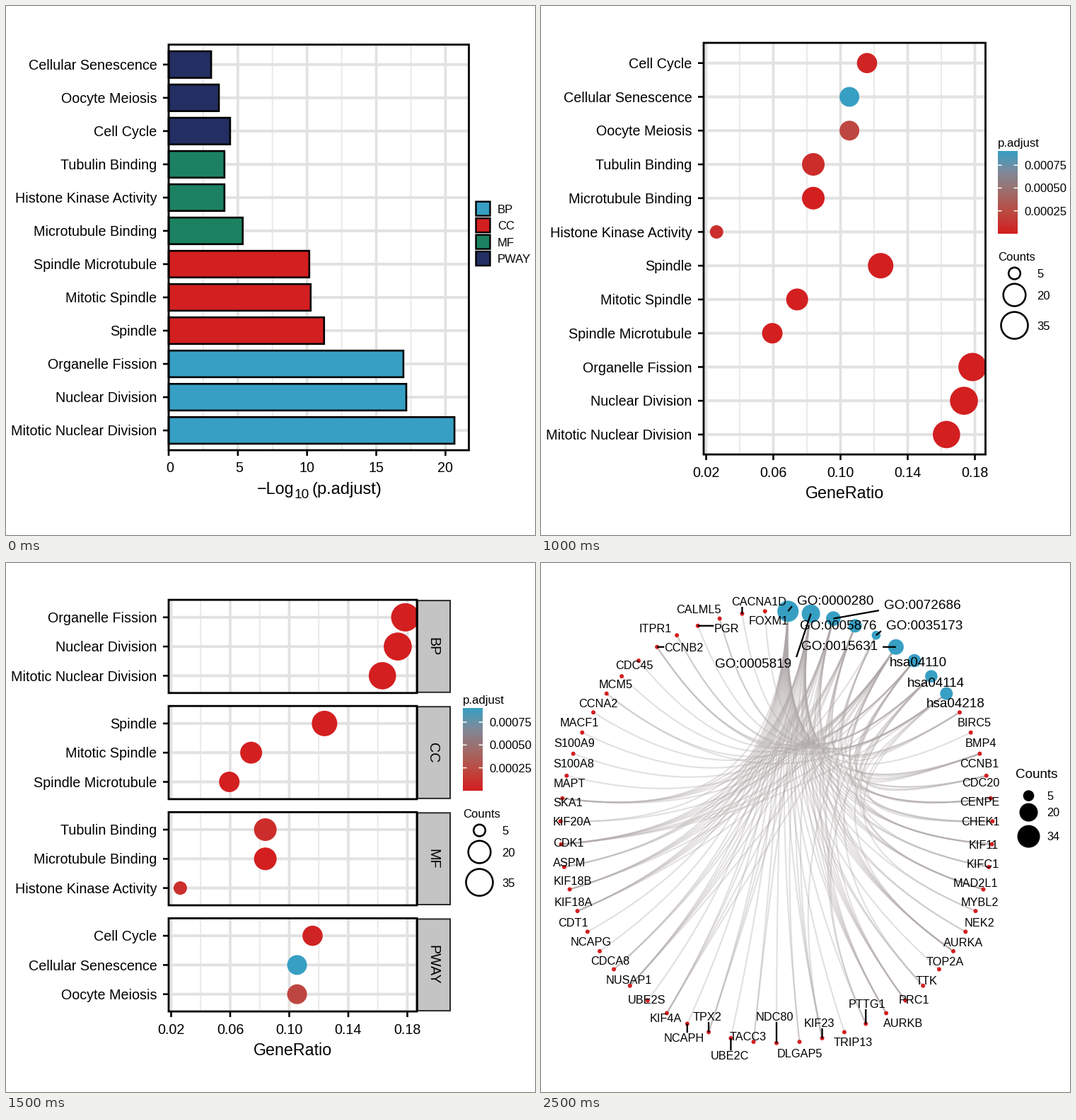
Write a matplotlib script that moves like this. It is 748 by 748 pixels and loops after 3 s.

```python
import numpy as np
import matplotlib.pyplot as plt
from matplotlib.animation import FuncAnimation
from matplotlib.colors import LinearSegmentedColormap
from matplotlib.patches import Circle, Rectangle
from matplotlib.collections import LineCollection

SIZE = 748
PT = 0.72  # points per pixel at 100 dpi
LIFT = 0.4
TERM, HUB, GENE = 19.8, 18.9, 16.3  # text sizes in pixels
BLUE, RED, GREEN, NAVY = "#379fc3", "#d31f20", "#1b8161", "#232f62"
EDGE = (0.69, 0.66, 0.66, 0.36)
RAMP = LinearSegmentedColormap.from_list(
    "ramp", [BLUE, "#7f8999", "#a06c6a", "#bd4840", RED])

plt.rcParams["font.family"] = "Liberation Sans"
fig = plt.figure(figsize=(SIZE / 100, SIZE / 100), dpi=100, facecolor="white")
ax = fig.add_axes([0, 0, 1, 1])

# group: (colour, [(term, -log10 p)])
BARS = {
    "BP": (BLUE, [("Organelle Fission", 16.96), ("Nuclear Division", 17.17),
                  ("Mitotic Nuclear Division", 20.65)]),
    "CC": (RED, [("Spindle Microtubule", 10.16), ("Mitotic Spindle", 10.26),
                 ("Spindle", 11.23)]),
    "MF": (GREEN, [("Tubulin Binding", 4.03), ("Histone Kinase Activity", 4.03),
                   ("Microtubule Binding", 5.35)]),
    "PWAY": (NAVY, [("Cellular Senescence", 3.07), ("Oocyte Meiosis", 3.63),
                    ("Cell Cycle", 4.44)]),
}

# group: [(term, gene ratio, radius, colour)]
DOTS = {
    "BP": [("Organelle Fission", .1786, 20, RED), ("Nuclear Division", .1735, 19.8, RED),
           ("Mitotic Nuclear Division", .1631, 19.3, RED)],
    "CC": [("Spindle", .1239, 18, RED), ("Mitotic Spindle", .0742, 15.5, RED),
           ("Spindle Microtubule", .0594, 14.5, RED)],
    "MF": [("Tubulin Binding", .0838, 16, "#cc2d2b"), ("Microtubule Binding", .0838, 16, RED),
           ("Histone Kinase Activity", .0262, 9.5, "#cb2f2d")],
    "PWAY": [("Cell Cycle", .1158, 14.3, "#d02324"), ("Cellular Senescence", .1053, 14, BLUE),
             ("Oocyte Meiosis", .1053, 14, "#be4640")],
}

# hub: (x, y, label x, label y, radius), in ring order
HUBS = {
    "GO:0000280": (314, 375, 372, 378, 15), "GO:0005819": (302, 403, 292, 406, 13),
    "GO:0072686": (326, 437, 361, 435, 10.3), "GO:0005876": (278, 380, 250, 366, 9.5),
    "GO:0035173": (440, 222, 420, 208, 6.3), "GO:0015631": (152, 534, 142, 539, 11),
    "hsa04110": (487, 228, 509, 237, 9.3), "hsa04114": (522, 312, 531, 306, 8.8),
    "hsa04218": (552, 405, 553, 405, 9),
}

# gene: (x, y[, label x, label y])
RIGHT = {
    "MCM5": (473, 72), "CDC45": (532, 100), "PGR": (595, 174), "CCNA2": (607, 246),
    "CCNB2": (607, 285, 613, 282), "CALML5": (641, 350, 627, 350), "ITPR1": (634, 399),
    "CACNA1D": (651, 489, 620, 489), "FOXM1": (616, 540), "MYBL2": (453, 444, 479, 434),
    "CDK1": (443, 385, 461, 398), "CCNB1": (435, 350, 467, 361),
    "CHEK1": (454, 330, 466, 334), "AURKA": (392, 362, 389, 350),
    "MAD2L1": (401, 325, 393, 318), "CDC20": (398, 293, 399, 291),
    "PTTG1": (406, 252, 408, 252), "TPX2": (368, 481, 358, 486),
    "ASPM": (341, 508, 354, 515), "NCAPG": (413, 497, 422, 505),
    "NDC80": (404, 450, 421, 463), "TRIP13": (389, 529, 418, 536),
    "UBE2C": (353, 549, 357, 562),
}
LEFT = {
    "TTK": (355, 258, 352, 258), "TOP2A": (311, 209, 325, 222),
    "NCAPH": (279, 208, 277, 195), "CDT1": (247, 217, 239, 222),
    "UBE2S": (214, 237, 205, 248), "BMP4": (183, 271, 172, 275),
    "CDCA8": (275, 274, 274, 266), "DLGAP5": (231, 293, 236, 302),
    "AURKB": (324, 298, 320, 293), "NEK2": (203, 318, 195, 328),
    "TACC3": (262, 322, 263, 328), "PRC1": (176, 379, 152, 366),
    "BIRC5": (193, 387, 199, 394), "KIF4A": (187, 417, 158, 421),
    "CENPE": (219, 426, 223, 435), "SKA1": (155, 444, 129, 448),
    "KIF11": (216, 457, 188, 461), "KIF18A": (241, 462, 266, 461),
    "NUSAP1": (237, 489, 207, 488), "KIF18B": (269, 491, 297, 488),
    "KIF23": (258, 520, 233, 515), "KIFC1": (284, 526, 292, 540),
    "KIF20A": (261, 594), "MACF1": (24, 506, 44, 506), "S100A9": (45, 574),
    "MAPT": (85, 634), "S100A8": (137, 675),
}
GENES = {**RIGHT, **LEFT}

LINKS = {
    "GO:0000280": "NCAPH TOP2A CDT1 UBE2S BMP4 CDCA8 DLGAP5 AURKB NEK2 TACC3 TTK PTTG1 "
                  "CDC20 MAD2L1 AURKA CHEK1 CCNB1 MYBL2 PRC1 BIRC5 KIF4A CENPE KIF11 KIF18A "
                  "NUSAP1 KIF18B KIF23 KIFC1 TPX2 ASPM NCAPG NDC80 TRIP13 UBE2C SKA1",
    "GO:0005819": "AURKA AURKB CDCA8 BIRC5 CDC20 CENPE DLGAP5 KIF11 KIF18A KIF18B KIF23 "
                  "KIFC1 MAD2L1 NEK2 NUSAP1 PRC1 TACC3 TPX2 TTK ASPM SKA1 CDK1 KIF4A CCNB1 "
                  "KIF20A",
    "GO:0072686": "ASPM AURKA AURKB CDCA8 CDK1 KIF11 KIF18A KIF18B MAD2L1 NUSAP1 PRC1 SKA1 "
                  "TPX2 KIF23 CENPE",
    "GO:0005876": "AURKA AURKB BIRC5 CDK1 KIF11 KIF18A KIF18B KIF4A NUSAP1 PRC1 SKA1 CENPE",
    "GO:0035173": "AURKA AURKB CCNB1 CDK1 CHEK1",
    "GO:0015631": "MACF1 S100A9 MAPT S100A8 KIF20A KIFC1 KIF23 KIF18A KIF18B KIF11 NUSAP1 "
                  "CENPE SKA1 KIF4A PRC1 BIRC5",
    "hsa04110": "MCM5 CDC45 CCNA2 CCNB2 CCNB1 CDK1 CHEK1 MAD2L1 CDC20 PTTG1 TTK",
    "hsa04114": "PGR CCNB2 CALML5 ITPR1 CCNB1 CDK1 MAD2L1 CDC20 PTTG1 AURKA",
    "hsa04218": "CCNA2 CCNB2 CALML5 ITPR1 CACNA1D FOXM1 MYBL2 CCNB1 CDK1 CHEK1",
}

# label centres around the ring, clockwise from the top
RING = {
    "GO:0000280": (416, 53), "GO:0005819": (300, 142), "GO:0072686": (539, 59),
    "GO:0005876": (420, 88), "GO:0035173": (542, 88), "GO:0015631": (422, 117),
    "hsa04110": (533, 140), "hsa04114": (558, 169), "hsa04218": (586, 198),
    "BIRC5": (613, 226), "BMP4": (622, 255), "CCNB1": (620, 284), "CDC20": (622, 311),
    "CENPE": (620, 338), "CHEK1": (621, 366), "KIF11": (626, 399), "KIFC1": (625, 426),
    "MAD2L1": (614, 453), "MYBL2": (620, 480), "NEK2": (620, 509), "AURKA": (597, 537),
    "TOP2A": (571, 564), "TTK": (545, 591), "PRC1": (527, 618), "AURKB": (512, 651),
    "PTTG1": (461, 624), "TRIP13": (441, 678), "KIF23": (393, 651), "DLGAP5": (366, 694),
    "NDC80": (330, 642), "TACC3": (293, 670), "UBE2C": (267, 697), "TPX2": (235, 642),
    "NCAPH": (202, 672), "KIF4A": (176, 644), "UBE2S": (150, 618), "NUSAP1": (124, 590),
    "CDCA8": (98, 563), "NCAPG": (71, 536), "CDT1": (45, 509), "KIF18A": (46, 480),
    "KIF18B": (45, 450), "ASPM": (40, 424), "CDK1": (39, 396), "KIF20A": (44, 366),
    "SKA1": (38, 339), "MAPT": (40, 312), "S100A8": (46, 284), "S100A9": (47, 255),
    "MACF1": (54, 226), "CCNA2": (81, 199), "MCM5": (106, 172), "CDC45": (132, 145),
    "CCNB2": (202, 120), "ITPR1": (162, 93), "PGR": (262, 93), "CALML5": (223, 66),
    "CACNA1D": (308, 55), "FOXM1": (322, 82),
}
LEADERS = ("GO:0000280 GO:0005819 GO:0072686 GO:0035173 GO:0015631 PTTG1 KIF23 NDC80 "
           "UBE2C TPX2 NCAPH CCNB2 PGR CACNA1D").split()


def text(x, y, s, size, ha="center"):
    """Write s with its capitals centred on y."""
    ax.text(x, y + 0.36 * size, s, fontsize=size * PT, ha=ha, va="baseline", zorder=9)


def line(xs, ys, width, color="black", z=1):
    ax.plot(xs, ys, color=color, lw=width * PT, solid_capstyle="butt", zorder=z, snap=False)


def rect(x0, y0, x1, y1, fill, edge="black", width=2.6, z=3):
    patch = Rectangle((x0, y0), x1 - x0, y1 - y0, fc=fill, ec=edge, lw=width * PT,
                      zorder=z, snap=False)
    return ax.add_patch(patch)


def disc(x, y, r, fill, edge="none", width=0, z=4):
    return ax.add_patch(Circle((x, y), r, fc=fill, ec=edge, lw=width * PT, zorder=z))


def panel(x0, y0, x1, y1, rows, major, minor):
    for x in minor:
        line([x, x], [y0, y1], 2, "#eaeaea")
    for x in major:
        line([x, x], [y0, y1], 3.7, "#e2e2e2")
    for name, y in rows:
        line([x0, x1], [y, y], 4, "#e2e2e2")
        line([x0 - 8, x0], [y, y], 2.6)
        text(213.5, y, name, TERM, "right")
    return rect(x0, y0, x1, y1, "none", width=2.8, z=6)


def strip(x0, y0, x1, y1, name):
    rect(x0, y0 + 1, x1, y1 - 1, "#c4c4c4", "#2b2b2b", 2, z=2)
    ax.text((x0 + x1) / 2 - 7.1, (y0 + y1) / 2, name, fontsize=TERM * PT, rotation=270,
            rotation_mode="anchor", ha="center", va="baseline", zorder=9)


def x_axis(y, ticks, labels, label_y):
    for x, s in zip(ticks, labels):
        line([x, x], [y, y + 8], 2.6)
        text(x + 2 * (len(s) == 1), label_y, s, TERM)


def layout(groups, faceted, top, bottom, pitch, height, pad, step):
    """Yield (group names, y0, y1, row centres) for each panel."""
    if faceted:
        for i, name in enumerate(groups):
            y0 = top + i * pitch
            yield [name], y0, y0 + height, [y0 + pad + k * step for k in range(3)]
    else:
        yield list(groups)[::-1], top, bottom, [top + pad + k * step for k in range(12)]


def bar_chart(faceted):
    unit, right, base = (17.39, 607, 629) if faceted else (19.57, 654.5, 628.5)
    spec = (148.1, 130, 24.6, 40.7) if faceted else (0, 0, 28.2, 47.03)
    major = [230 + unit * v for v in (0, 5, 10, 15, 20)]
    minor = [230 + unit * v for v in (2.5, 7.5, 12.5, 17.5)]
    for names, y0, y1, ys in layout(BARS, faceted, 55, base, *spec):
        items = [(BARS[n][0], *it) for n in names for it in BARS[n][1]]
        panel(230, y0, right, y1, [(it[1], y) for it, y in zip(items, ys)], major, minor)
        half = 0.4 * spec[3]
        for (color, _, value), y in zip(items, ys):
            rect(230, y - half, 230 + unit * value, y + half, color)
        if faceted:
            strip(right + 1, y0, 653.5, y1, names[0])
    x_axis(base, major, ["0", "5", "10", "15", "20"], base + 24)

    left, y = (right + 230) / 2 - 87, base + 53.5
    for dx, s, size, ha in ((0, "−Log", 23.4, "left"), (52.5, "10", 19, "left"),
                            (176, "(p.adjust)", 23.6, "right")):
        text(left + dx, y + (8 if s == "10" else 0), s, size, ha)

    for i, (name, (color, _)) in enumerate(BARS.items()):
        y = 287 + faceted + 23.5 * i
        rect(664.5, y - 10, 684.5, y + 10, color, width=2.4)
        text(695, y, name, 16.6, "left")


def dot_plot(faceted):
    unit, right = (2087.5, 581) if faceted else (2375, 628.5)
    spec = (150.1, 131.7, 24.7, 41.3) if faceted else (0, 0, 28.6, 47.75)

    def at(v):
        return 233.5 + unit * (v - 0.02)

    values = [.02, .06, .10, .14, .18]
    major = [at(v) for v in values]
    minor = [at(v + .02) for v in values[:4]]
    for names, y0, y1, ys in layout(DOTS, faceted, 52.5, 634.5, *spec):
        items = [it for n in names for it in DOTS[n]]
        frame = panel(230, y0, right, y1, [(it[0], y) for it, y in zip(items, ys)],
                      major, minor)
        for (_, ratio, r, color), y in zip(items, ys):
            disc(at(ratio), y, r, color).set_clip_path(frame)
        if faceted:
            strip(right + 1, y0, 628, y1, names[0])
    x_axis(634.5, major, [f"{v:.2f}" for v in values], 659)
    text((230 + right) / 2, 688, "GeneRatio", 23.3)

    text(646, 193, "p.adjust", 16.8, "left")
    ax.imshow(np.linspace(0, 1, 256)[:, None], cmap=RAMP, extent=(646, 674, 322, 205),
              aspect="auto", zorder=2)
    for y, s in ((225.5, "0.00075"), (257.7, "0.00050"), (290, "0.00025")):
        line([646, 651.5], [y, y], 1.5, "white", 3)
        line([668.5, 674], [y, y], 1.5, "white", 3)
        text(683.5, y, s, 16.6, "left")
    text(646, 354, "Counts", 16.6, "left")
    for y, r, s in ((378.5, 8.3, "5"), (409, 15.8, "20"), (452, 19, "35")):
        disc(669.5, y, r, "none", "black", 2.6)
        text(701, y, s, 16.6, "left")


def count_legend(x):
    text(x, 298, "Counts", HUB, "left")
    for y, r, s in ((329.5, 7.8, "5"), (353, 13, "20"), (387, 16, "34")):
        disc(x + 18.5, y, r, "black")
        text(x + 44.5, y, s, GENE, "left")


def edges(curves):
    ax.add_collection(LineCollection(curves, colors=[EDGE], linewidths=2.1 * PT, zorder=1),
                      autolim=False)


def pairs():
    return [(hub, gene) for hub, genes in LINKS.items() for gene in genes.split()]


def network():
    edges([(HUBS[h][:2], GENES[g][:2]) for h, g in pairs()])
    for name, (x, y, lx, ly, r) in reversed(HUBS.items()):
        disc(x, y, r, BLUE, "white", 1.2)
        text(lx, ly, name, HUB)
    for name, spot in GENES.items():
        disc(*spot[:2], 3, RED, z=5)
        text(*spot[-2:], name, GENE)
    count_legend(681)


def ring():
    mid = np.array([333, 373.7])
    angle = (np.arange(len(RING)) + 0.5) * 2 * np.pi / len(RING)
    spokes = 305.5 * np.column_stack([np.sin(angle), -np.cos(angle)])
    pos = dict(zip(RING, spokes))

    # cubic arcs whose controls lie on the spokes, pulled towards the centre
    pull = 0.3
    t = np.linspace(0, 1, 50)[:, None]
    w0 = (1 - t) ** 3 + 3 * pull * t * (1 - t) ** 2
    w1 = w0[::-1]
    edges([mid + w0 * pos[h] + w1 * pos[g] for h, g in pairs()])

    for name, label in RING.items():
        hub = name in HUBS
        x, y = pos[name] + mid
        disc(x, y, HUBS[name][4] if hub else 3, BLUE if hub else RED)
        size = HUB if hub else GENE
        text(*label, name, size)
        if name in LEADERS:
            half = np.array([len(name) * size * 0.31 + 2.5, size * 0.45])
            end = np.clip((x, y), label - half, label + half)
            line([x, end[0]], [y, end[1]], 2.3, z=6)
    count_legend(671)


SCENES = [lambda: bar_chart(False), lambda: bar_chart(True),
          lambda: dot_plot(False), lambda: dot_plot(True), network, ring]


def draw(i):
    ax.clear()
    ax.axis("off")
    SCENES[i]()
    ax.set_aspect("auto")
    ax.set_xlim(0, SIZE)
    ax.set_ylim(SIZE + LIFT, LIFT)
    return []


anim = FuncAnimation(fig, draw, frames=len(SCENES), interval=500, repeat=True,
                     repeat_delay=0, blit=False)
plt.show()
```
